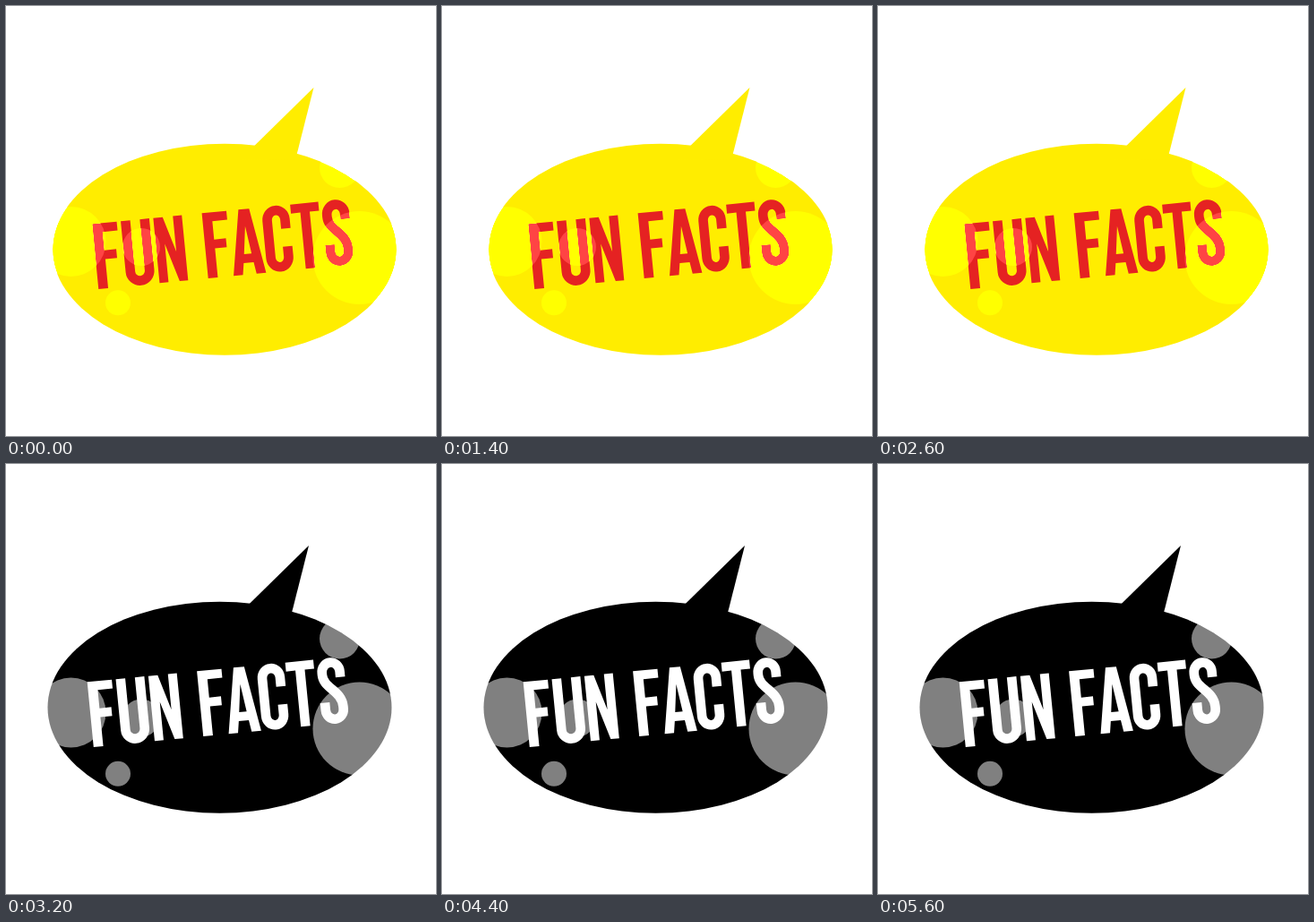
Recreate the animation shown at these times as an HTML page with a canvas. Size 480 by 480 pixels, loop 6000 ms.

```html
<!DOCTYPE html>
<html lang="en">
<head>
<meta charset="utf-8">
<title>Fun Facts</title>
<style>
  html, body { margin: 0; width: 100%; height: 100%; overflow: hidden; background: #fff; }
  canvas { display: block; }
</style>
</head>
<body>
<canvas id="stage" width="480" height="480" role="img" aria-label="FUN FACTS"></canvas>
<script>
const ctx = document.getElementById('stage').getContext('2d');
const STEP = 400;

// dx moves the bubble, dy the spots; blends tint the spots
const looks = [
  { bubble: '#ffed00', ink: '#e52222', dx: 0, dy: 0,
    blends: [['color-dodge', '#808080']] },
  { bubble: '#e52222', ink: '#ffed00', dx: -11.5, dy: 10,
    blends: [['color-dodge', '#808080'], ['multiply', '#ffed00']] },
  { bubble: '#000', ink: '#fff', dx: -5.5, dy: 14.5,
    blends: [['screen', '#808080']] }
];

const spots = [
  [72.5, 263, 39], [125, 331.3, 14], [151, 269, 21],
  [372.5, 180.5, 22.5], [394.5, 281, 52]
];

// Condensed capitals, 73 high, standing on y = 0
const solid = {
  F: 'M0,0V-73H27.5V-63H10.8V-42.5H24V-32.5H10.8V0Z',
  N: 'M0,0V-73H10.5L22,-33V-73H32V0H22.5L10,-43V0Z',
  A: 'M0,0L12.5,-73H24.5L36.5,0H25.8L23.8,-13H12.6L10.5,0Z M14,-23H22.4L18.2,-54Z',
  T: 'M0,-73H31.5V-63H21V0H10.5V-63H0Z'
};
const line = {
  U: 'M5.3,-73V-15.5A10.7,10.7 0 0 0 26.7,-15.5V-73',
  C: 'M25.2,-47V-57.5A9.95,10.7 0 0 0 5.3,-57.5V-15.5A9.95,10.7 0 0 0 25.2,-15.5V-27',
  S: 'M25.2,-51V-57.5A9.95,10.7 0 0 0 5.3,-57.5V-55C5.3,-40 25.2,-36 25.2,-18V-15.5A9.95,10.7 0 0 1 5.3,-15.5V-24'
};
const word = [
  ['F', 0], ['U', 32], ['N', 68.5], ['F', 123], ['A', 151.5],
  ['C', 189.5], ['T', 222], ['S', 256.5]
].map(([c, x]) => ({ x, solid: c in solid, path: new Path2D(solid[c] || line[c]) }));

function drawBubble(color) {
  ctx.fillStyle = color;
  ctx.beginPath();
  ctx.ellipse(244, 271.7, 192, 118, 0, 0, Math.PI * 2);
  ctx.fill();
  ctx.beginPath();
  ctx.moveTo(343.5, 91);
  ctx.lineTo(262, 171);
  ctx.lineTo(323, 172);
  ctx.fill();
}

function drawWord(color) {
  ctx.fillStyle = ctx.strokeStyle = color;
  ctx.lineWidth = 10.6;
  ctx.translate(103.3, 316);
  ctx.rotate(-5.6 * Math.PI / 180);
  for (const { x, solid, path } of word) {
    ctx.save();
    ctx.translate(x, 0);
    if (solid) ctx.fill(path, 'evenodd');
    else ctx.stroke(path);
    ctx.restore();
  }
}

function drawSpots({ dy, blends }) {
  for (const [mode, color] of blends) {
    ctx.globalCompositeOperation = mode;
    ctx.fillStyle = color;
    for (const [x, y, r] of spots) {
      ctx.beginPath();
      ctx.arc(x, y + dy, r, 0, Math.PI * 2);
      ctx.fill();
    }
  }
  ctx.globalCompositeOperation = 'source-over';
}

function draw(t) {
  const look = looks[Math.floor(t / STEP) % looks.length];
  ctx.fillStyle = '#fff';
  ctx.fillRect(0, 0, 480, 480);
  ctx.save();
  ctx.translate(look.dx, 0);
  drawBubble(look.bubble);
  drawWord(look.ink);
  ctx.restore();
  drawSpots(look);
}

const start = performance.now();
function tick() {
  draw(performance.now() - start);
  requestAnimationFrame(tick);
}
tick();
</script>
</body>
</html>
```
